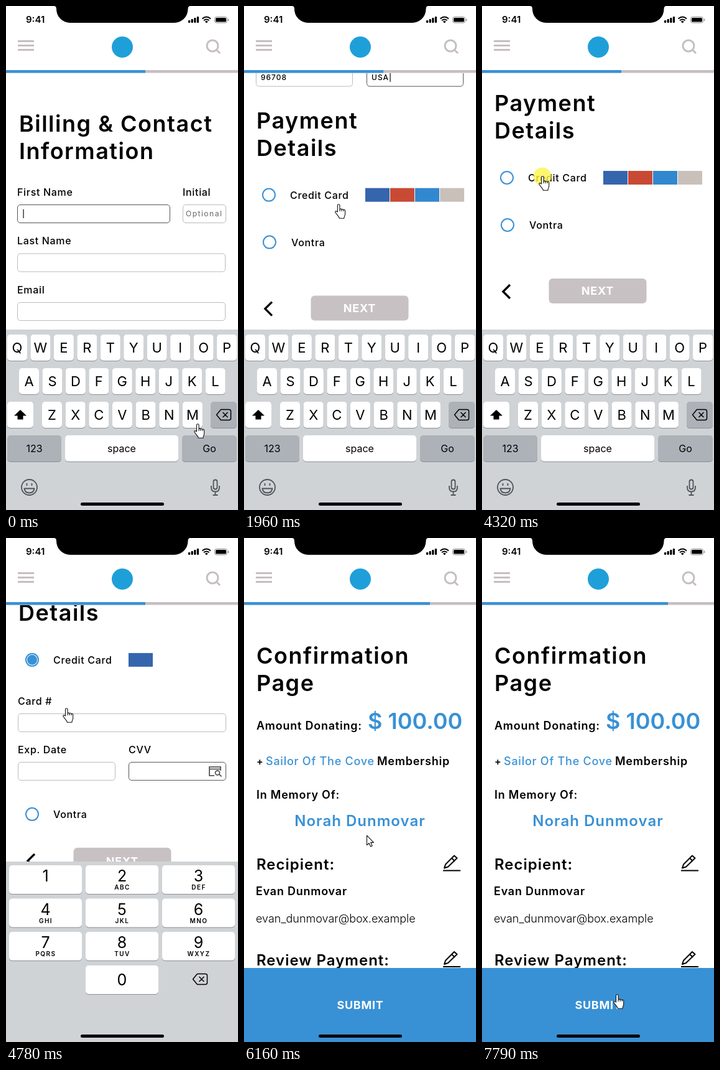
Write an HTML page that moves like this. It is 373 px wide and 810 px high and loops after 8.18 s.

```html
<!DOCTYPE html>
<html lang="en">
<head>
<meta charset="utf-8">
<title>Checkout flow</title>
<style>
html, body { margin: 0; width: 100%; height: 100%; overflow: hidden; background: #fff }
svg { display: block; width: 373px; height: 810px; font-family: Inter, sans-serif }
text { letter-spacing: .042em; white-space: pre }
.mid { text-anchor: middle }
.plain { letter-spacing: 0 }
.typed { letter-spacing: 1px }
.card { letter-spacing: .4px }
.sub { letter-spacing: 1.5px }
.line { fill: none; stroke: #000; stroke-width: 2; stroke-linejoin: round }
.thin { fill: none; stroke: #000; stroke-width: 1.5; stroke-linejoin: round }
.icon { fill: none; stroke: #555; stroke-width: 1.8 }
</style>
</head>
<body>
<svg id="stage" viewBox="0 0 373 810"></svg>
<script>
const LOOP = 8180, BLUE = '#3891d5', PALE = '#c6bec4', DULL = '#c8c1c3', GRAY_KEY = '#adb2b8';

const text = (x, y, size, weight, str, attrs = '') =>
  `<text x="${x}" y="${y}" font-size="${size}" font-weight="${weight}" ${attrs}>${str}</text>`;
const rect = (x, y, w, h, fill, r = 0, attrs = '') =>
  `<rect x="${x}" y="${y}" width="${w}" height="${h}" rx="${r}" fill="${fill}" ${attrs}/>`;
const path = (d, attrs = 'class="line"') => `<path d="${d}" ${attrs}/>`;
const group = (id, ...parts) => `<g id="${id}">${parts.join('')}</g>`;
const title = (x, y, a, b) => text(x, y, 36, 600, a) + text(x, y + 44, 36, 600, b);
const label = (x, y, str) => text(x, y, 16, 500, str);
const typed = (x, y, str, cls = 'typed') => text(x, y, 12, 500, str, `class="${cls}"`);
const field = (x, y, w, id = '', stroke = '#bfb9bf') =>
  rect(x + .5, y + .5, w - 1, 29, '#fff', 4.5, `stroke="${stroke}" ${id && `id="${id}"`}`);
const radio = (x, y, on) =>
  `<circle cx="${x}" cy="${y}" r="10" fill="#fff" stroke="${BLUE}" stroke-width="2"/>` +
  (on ? `<circle cx="${x}" cy="${y}" r="8" fill="${BLUE}"/>` : '');
const chevron = (x, y) => path(`M${x + 12} ${y - 11}l-11 11 11 11`, 'fill="none" stroke="#000" stroke-width="3.4"');
const nextButton = (x, y, h, id) => rect(x, y, 157, h, DULL, 6, `id="${id}"`) +
  text(x + 78.5, y + h / 2 + 6, 18, 700, 'NEXT', 'class="mid" fill="#fff"');
const pencil = y =>
  path(`M320 ${y + 25}h28M322 ${y + 21}l2-6 14-14 4.5 4-14.5 14zM334 ${y + 5}l5 5`);

const billing = group('billing',
  title(21, 202, 'Billing &amp; Contact', 'Information'),
  label(18, 305, 'First Name'), field(18, 319, 246, 'first', '#555'), typed(26, 338, '|'),
  label(284, 305, 'Initial'), field(284, 319, 70),
  text(289, 338, 12, 400, 'Optional', 'fill="#666" class="sub"'),
  label(18, 383, 'Last Name'), field(18, 397.5, 335),
  label(18, 462, 'Email'), field(18, 476, 335),
  label(18, 540, 'Address'), field(18, 554, 335),
  label(18, 618, 'City'), field(19, 632, 156), typed(27, 651, 'Maui'),
  label(197, 618, 'State'), field(197, 632, 156), typed(205, 651, 'HI'),
  label(18, 696, 'ZIP'), field(19, 710, 156), typed(27, 729, '96708'),
  label(197, 696, 'Country'), field(197, 710, 156, '', '#555'), typed(205, 729, 'USA|'),
  title(20, 807, 'Payment', 'Details'),
  radio(40, 914), label(74, 920, 'Credit Card'),
  ['#3565ad', '#c94a34', '#3288cf', '#c9c0ba'].map((c, i) => rect(195 + 40 * i, 903, 39, 22, c)).join(''),
  radio(41, 990), label(76, 996, 'Vontra'),
  chevron(33, 1097), nextButton(107.5, 1076, 40, 'nextOff'));

const payment = group('payment',
  rect(0, -60, 373, 900, '#fff'), title(20, 38, 'Payment', 'Details'),
  radio(42, 145, true), label(76, 151, 'Credit Card'), rect(197, 134, 39, 22, '#3565ad'),
  label(19, 217, 'Card #'), field(19, 231, 335),
  label(19, 295, 'Exp. Date'), field(19, 309, 157),
  label(197, 295, 'CVV'), field(197, 309, 157, '', '#555'),
  path('M335 331h-8v-14h18v6M327 320.5h18', 'class="icon"'),
  path('M343 329l3.5 3.5M343.5 326.5a3.5 3.5 0 1 1-7 0 3.5 3.5 0 0 1 7 0', 'class="icon"'),
  group('number', typed(27, 250, '4444-5555-6666-1234', 'card')),
  group('expiry', typed(27, 328, '12/21')),
  group('code', typed(205, 328, '506|')),
  radio(42, 393), label(76, 399, 'Vontra'),
  chevron(34, 468), nextButton(108.5, 447, 44, 'nextOn'));

// Keyboards
const key = (x, y, w, h, str = '', size = 22, fill = '#fff') =>
  rect(x, y + 1, w, h, '#8c8f94', 5) + rect(x, y, w, h, fill, 5) +
  text(x + w / 2, y + h / 2 + size * .365, size, 400, str, 'class="mid plain"');
const row = (letters, x, y, step) => [...letters].map((c, i) => key(x + step * i, y, 32, 42, c)).join('');
const erase = (x, y) =>
  path(`M${x} ${y}l7-8.5h13q3 0 3 3v11q0 3-3 3h-13zM${x + 10} ${y - 4}l8 8m0-8l-8 8`, 'class="thin"');
const board = '#d0d3d6';

const letters = group('letters',
  rect(0, 520, 373, 290, board),
  row('QWERTYUIOP', 2, 528, 37.45), row('ASDFGHJKL', 21, 582, 37.45), row('ZXCVBNM', 58, 636, 37.65),
  key(2, 636, 42, 42), path('M23 649l10 9.5h-5.5v6h-9v-6H13z', ''),
  key(329, 636, 42, 42, '', 22, GRAY_KEY), erase(338.5, 657),
  key(2, 690, 87, 42, '123', 16, GRAY_KEY), key(95, 690, 182, 42, 'space', 16), key(283, 690, 88, 42, 'Go', 16, GRAY_KEY),
  `<g fill="none" stroke="#50555c" stroke-width="1.8"><circle cx="37.5" cy="773.5" r="12.5"/>
   <path d="M29.5 775.5h16q-1 7-8 7t-8-7zM33.5 767v4m8-4v4"/>
   <rect x="333.5" y="761.5" width="6" height="15" rx="3"/><path d="M330 771v3q0 6.500 6.500 6.500t6.500-6.500v-3M336.500 780.500v5.500m-4 0h8"/></g>`);

const captions = ['', 'ABC', 'DEF', 'GHI', 'JKL', 'MNO', 'PQRS', 'TUV', 'WXYZ'];
const keypad = group('keypad',
  rect(0, 520, 373, 290, board),
  captions.map((c, i) => {
    const x = 5 + 123 * (i % 3), y = 526 + 53.5 * Math.floor(i / 3);
    return key(x, y, 117, 46) + text(x + 58.5, y + 26, 25, 400, i + 1, 'class="mid plain"') +
      text(x + 59, y + 39, 10, 600, c, 'class="mid sub"');
  }).join(''),
  key(128, 687, 117, 46, '0', 25), erase(300.5, 709));

const confirm = group('confirm',
  rect(0, 100, 373, 710, '#fff'), title(20, 202, 'Confirmation', 'Page'),
  text(20, 308, 18, 600, 'Amount Donating:'),
  text(199, 307, 36, 600, '$ 100.00', `fill="${BLUE}" class="plain"`),
  text(20, 365, 16, 600, '+'), text(35, 365, 18, 500, 'Sailor Of The Cove', `fill="${BLUE}"`),
  text(214, 365, 18, 600, 'Membership'), text(20, 419, 18, 600, 'In Memory Of:'),
  text(186.5, 463, 24, 600, 'Norah Dunmovar', `fill="${BLUE}" class="mid"`),
  text(20, 533, 24, 600, 'Recipient:'), pencil(509.5),
  text(19, 574, 18, 600, 'Evan Dunmovar'),
  text(19, 618, 18, 300, 'evan_dunmovar@box.example', 'class="plain"'),
  text(20, 687, 24, 600, 'Review Payment:'), pencil(664),
  rect(0, 691, 373, 119, BLUE), text(187, 757, 18, 700, 'SUBMIT', 'class="mid" fill="#fff"'));

const header = group('header',
  rect(0, 0, 373, 108, '#fff'),
  path('M77 0q4 0 4 5a22 22 0 0 0 22 22H270.500a22 22 0 0 0 22-22q0-5 4-5z', ''),
  text(32, 27, 15, 600, '9:41', 'class="plain"'),
  [4, 6, 8, 10].map((h, i) => rect(293 + 4.6 * i, 27 - h, 3.2, h, '#000', 1)).join(''),
  path('M315.5 20.5q7-6 13.5 0M318 23.3q4.3-3.5 8.5 0'),
  path('M319.8 25q2.5-2 5 0l-2.5 2.5z', ''),
  rect(335.5, 17.5, 20, 9.5, 'none', 3, 'stroke="#888"'), rect(337, 19, 17, 6.5, '#000', 1.5),
  rect(357, 20.5, 1.3, 3.5, '#888'),
  [55, 62, 69].map(y => rect(19, y, 26, 3, PALE)).join(''),
  `<circle cx="187" cy="66" r="17" fill="#1f9fd9"/>`,
  `<g fill="none" stroke="${PALE}" stroke-width="3"><circle cx="332" cy="64" r="9"/><path d="M338 70l6 6"/></g>`,
  rect(0, 103, 373, 4.5, PALE), rect(0, 103, 224, 4.5, BLUE, 0, 'id="progress"'));

const pointer = `<circle id="tap" cx="97" cy="274" r="14.5" fill="#fdf54b" opacity=".8"/>` +
  `<g id="pointer" fill="#fff" stroke="#111" stroke-width="1.1" stroke-linejoin="round">` +
  path('M4.5 13V2.5a1.8 1.8 0 0 1 3.6 0V9a1.6 1.6 0 0 1 3 .3 1.6 1.6 0 0 1 3 .6 1.5 1.5 0 0 1 2.6 1V16c0 3-1.6 4-1.8 7.3H7.5C7 20 3 17.5 1 13.5c-.8-1.8 1.2-2.8 3.5-.5zM8.1 9v3m3-2.5V12m3-2v2', 'id="hand"') +
  path('M.5.5V16l3.5-3.2 2.6 5.6 2.6-1.2-2.5-5.4H11.5z', 'id="arrow"') + '</g>';

stage.innerHTML = billing + payment + letters + keypad + confirm + header +
  rect(120, 798, 134, 5, '#000', 2.5) + pointer;

const part = id => document.getElementById(id);
const ease = (t, from, to) => {
  const p = Math.min(1, Math.max(0, (t - from) / (to - from)));
  return p * p * (3 - 2 * p);
};
const show = (id, on) => part(id).style.display = on ? '' : 'none';
const shift = (id, x, y) => part(id).setAttribute('transform', `translate(${x} ${y})`);

// Pointer path: time, x, y
const stops = [
  [70, 302, 671], [370, 142, 330], [1060, 142, 330], [1140, 142, 332], [1440, 142, 332],
  [2190, 147, 314], [2270, 143, 328], [2500, 143, 328], [2660, 135, 337], [2860, 85, 356],
  [3020, 112, 356], [3490, 112, 356], [3800, 31, 345], [3960, 33, 295], [4250, 91, 279],
  [4320, 91, 273], [5070, 91, 273], [5540, 197, 477], [6710, 197, 478], [7010, 218, 656],
  [7410, 219, 660], [7560, 219, 660], [7790, 211, 733]
];
function pointerAt(t) {
  const i = stops.findIndex(s => s[0] > t);
  if (i === 0) return stops[0].slice(1);
  if (i < 0) return stops[stops.length - 1].slice(1);
  const [t0, x0, y0] = stops[i - 1], [t1, x1, y1] = stops[i], p = ease(t, t0, t1);
  return [x0 + (x1 - x0) * p, y0 + (y1 - y0) * p];
}

function draw(t) {
  shift('billing', 0, -514 * ease(t, 760, 910) - 124 * ease(t, 1440, 2190));
  part('first').setAttribute('stroke', t < 760 ? '#555' : '#bfb9bf');

  const open = t >= 4390;
  show('payment', open);
  show('keypad', open);
  shift('payment', 0, 131 * (1 - ease(t, 4390, 5070)));
  show('number', t >= 5150);
  show('expiry', t >= 5230);
  show('code', t >= 5310);
  part('nextOn').setAttribute('fill', t >= 5310 ? BLUE : DULL);

  const swap = ease(t, 5860, 6160);
  part('confirm').setAttribute('opacity', t < 5920 ? 0 : swap);
  part('progress').setAttribute('width', t < 5920 ? 224 : 224 + 75 * swap);

  const [x, y] = pointerAt(t), arrow = t > 6000 && y < 691;
  shift('pointer', x, y);
  show('arrow', arrow);
  show('hand', !arrow);
  show('tap', t >= 4320 && t < 4470);
}

const start = performance.now();
(function tick() {
  draw((performance.now() - start) % LOOP);
  requestAnimationFrame(tick);
})();
</script>
</body>
</html>
```
